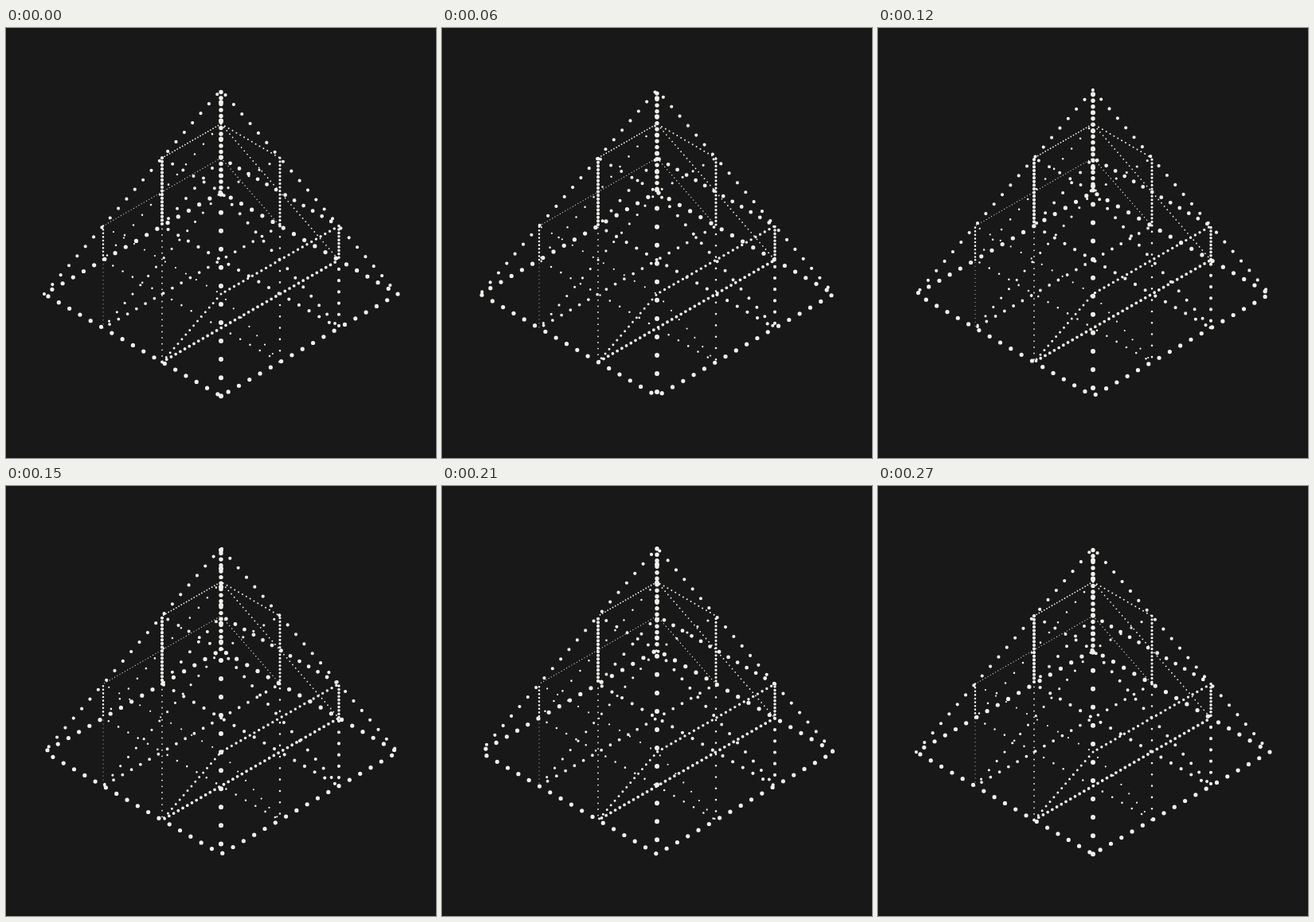
An HTML page with a canvas that plays this animation: 540x540 px, repeating every 300 ms.

```html
<!DOCTYPE html>
<html lang="en">
<head>
<meta charset="utf-8">
<title>Dotted pyramid</title>
<style>
  html, body { margin: 0; width: 100%; height: 100%; overflow: hidden; background: #181818; }
  canvas { display: block; }
</style>
</head>
<body>
<canvas id="stage" width="540" height="540"></canvas>
<script>
const ctx = document.getElementById('stage').getContext('2d');
const LOOP = 300, STEP = 30, STEPS = 9;

// Isometric grid: a runs right, b runs left, c runs up.
const project = ([a, b, c]) => [270 + 74 * (a - b), 205.9 + 42.72 * (a + b - c)];

// [corners as "abc" digits, dot spacing, dot radius, starting phase]
const paths = [
  // inner slices, fine to coarse
  ['130 020', 5, 0.5],
  ['021 001', 3.7, 0.6],
  ['001 100', 4.6, 0.7],
  ['230 010', 7.6, 0.9],
  ['012 002', 3.7, 0.9],
  ['002 200', 5.6, 0.9],
  ['002 102', 5.6, 1],
  ['021 221 320', 15, 1.1],
  ['002 020', 16.8, 1.3],
  ['020 320', 14.2, 1.3],
  ['320 100', 14.3, 1.3],
  ['102 112 130', 15, 1.6],
  ['100 130', 13, 1.9],
  ['010 310', 14.6, 2.1, 0.6],
  ['012 112 310', 15.2, 2],
  ['001 010', 16.8, 2],
  ['001 201', 13.3, 2.4],
  ['310 200', 14.2, 2.1, 0.2],
  ['201 221', 6.6, 1.7],
  ['221 230', 7.5, 1.5],
  ['230 200', 6.6, 1.9],
  // short uprights
  ['021 020', 4.6, 1.3],
  ['102 100', 4.6, 1.6],
  ['201 200', 4.4, 1.8],
  ['012 010', 4.6, 2.1],
  // outer edges
  ['030 003 300', 15.8, 2.1],
  ['300 330 030', 15.36, 2.6],
  ['030 000 300', 15.24, 2.6, 0.75],
  ['003 000', 7.5, 2.7, 0.36],
  ['330 003', 23.05, 3]
].map(([corners, gap, radius, phase = 0]) => ({
  points: corners.split(' ').map(corner => project([...corner].map(Number))),
  gap, radius, phase
}));

function addDots({ points, gap, radius, phase }, shift) {
  let at = (phase + shift) % 1 * gap;
  for (let i = 1; i < points.length; i++) {
    const [x0, y0] = points[i - 1], [x1, y1] = points[i];
    const length = Math.hypot(x1 - x0, y1 - y0);
    for (; at <= length; at += gap) {
      const u = at / length, x = x0 + (x1 - x0) * u, y = y0 + (y1 - y0) * u;
      ctx.moveTo(x + radius, y);
      ctx.arc(x, y, radius, 0, 2 * Math.PI);
    }
    at -= length;
  }
}

function draw(now) {
  const shift = Math.floor(now % LOOP / STEP) / STEPS;
  ctx.fillStyle = '#181818';
  ctx.fillRect(0, 0, 540, 540);
  ctx.fillStyle = '#f0f0ec';
  ctx.beginPath();
  paths.forEach(path => addDots(path, shift));
  ctx.fill();
}

const start = performance.now();
function tick() {
  draw(performance.now() - start);
  requestAnimationFrame(tick);
}
tick();
</script>
</body>
</html>
```
